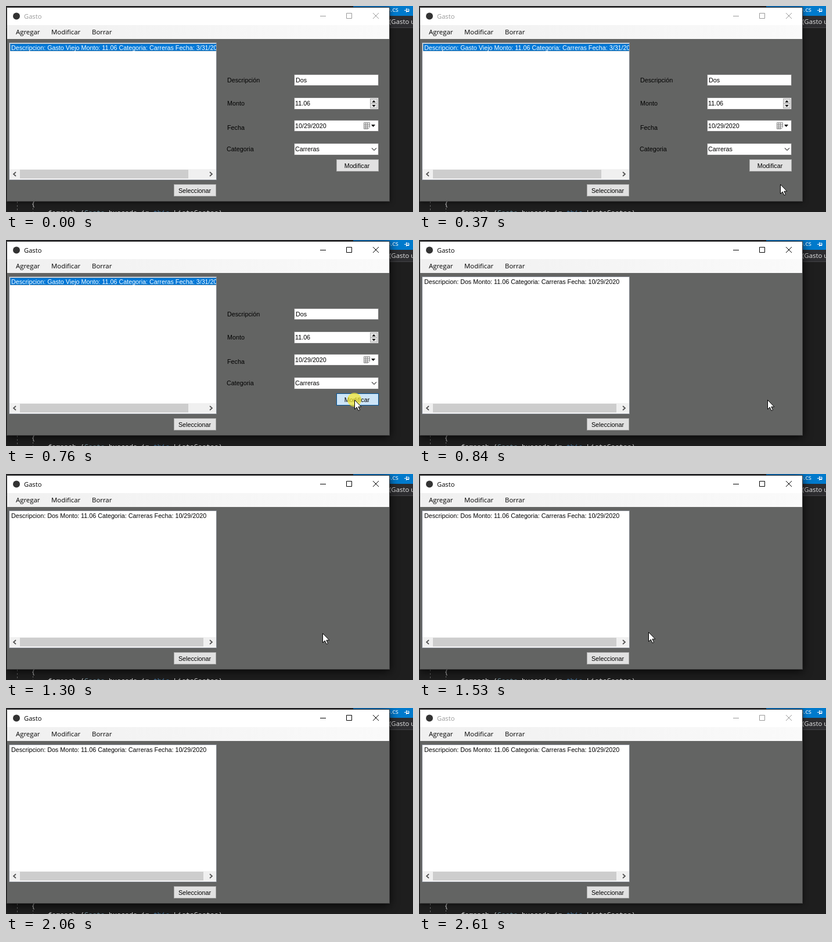
An HTML page that plays this animation: 701x356 px, repeating every 2.78 s.

```html
<!DOCTYPE html>
<html lang="es">
<meta charset="utf-8">
<title>Gasto</title>
<style>
  html, body { margin: 0; height: 100%; overflow: hidden; background: #1e1e1e; }
  svg { display: block; width: 701px; height: 356px; font: 10.75px "Liberation Sans", Arial, sans-serif; }
  text { white-space: pre; }
  rect { shape-rendering: crispEdges; }
  .ui { font: 11.4px "Open Sans", sans-serif; }
  .code { font: 11.66px "Noto Sans Mono", monospace; fill: #d4d4d4; }
  .field { fill: #fff; stroke: #7a7a7a; }
  .button { fill: #e1e1e1; stroke: #adadad; }
  .hover { fill: #e5f1fb; stroke: #0078d7; }
  .pressed { fill: #cce4f7; stroke: #005499; }
  .line { fill: none; stroke: #505050; }
  #shadow { filter: drop-shadow(0 1px 4px rgba(0, 0, 0, .6)); }
  .active #shadow { filter: drop-shadow(0 3px 8px rgba(0, 0, 0, .8)); }
  #caption { fill: #999; stroke: #999; }
  .active #caption { fill: #000; stroke: #000; }
  #caption text { stroke: none; }
</style>
<svg id="stage" viewBox="0 0 701 356">
  <defs>
    <linearGradient id="strip"><stop stop-color="#f0f0f0"/><stop offset="1" stop-color="#fafafa"/></linearGradient>
    <clipPath id="row"><rect x="6" y="64" width="356" height="16"/></clipPath>
  </defs>

  <!-- Code editor behind the window -->
  <rect width="701" height="356" fill="#1e1e1e"/>
  <rect width="701" height="37" fill="#2d2d30"/>
  <rect y="37" width="701" height="1" fill="#434346"/>
  <rect x="598" width="103" height="17" fill="#007acc"/>
  <g class="ui" fill="#e8e8e8">
    <text x="42" y="10">RegistroDeGastoUI.cs</text>
    <text x="208" y="10">ModificacionGastoUI.cs</text>
    <text x="382" y="10">ModificacionGastoUI.cs [Design]</text>
    <text x="676" y="10" text-anchor="end" fill="#fff">Repositorio.cs</text>
    <text x="660" y="31">(Gasto usuario)</text>
  </g>
  <path d="M686 7.5h3M689.5 4v7M690 5.5h4v4h-4M690 8.5h4" fill="none" stroke="#fff"/>
  <path d="M19.500 338v18M46.500 349v7" stroke="#666" stroke-dasharray="3 3"/>
  <g class="code">
    <text x="43.500" y="346">{</text>
    <text x="72" y="361">foreach (<tspan fill="#6f8f9c">Gasto</tspan> buscado in <tspan fill="#4c7ca5">this</tspan>.ListaGastos)</text>
  </g>

  <!-- Window frame -->
  <rect id="shadow" x="1" y="2" width="660" height="336" fill="#444"/>
  <rect x="2" y="3" width="658" height="30" fill="#fff"/>
  <rect x="2" y="33" width="658" height="24" fill="url(#strip)"/>
  <rect x="2" y="57" width="658" height="280" fill="#636463"/>
  <circle cx="18" cy="17.500" r="6" fill="#333"/>
  <g id="caption">
    <text class="ui" x="31" y="22" style="font-size:11.200px">Gasto</text>
    <path d="M541 17.500h10M586.500 12.500h9v9h-9zM632 12l10 10M642 12l-10 10" fill="none"/>
  </g>
  <g class="ui">
    <text x="17" y="49">Agregar</text>
    <text x="78" y="49">Modificar</text>
    <text x="148" y="49">Borrar</text>
  </g>

  <!-- Expense list -->
  <rect x="5.500" y="63.500" width="357" height="237" fill="#fff" stroke="#828790"/>
  <g id="selected" clip-path="url(#row)">
    <rect x="7" y="65" width="355" height="13" fill="#0078d7"/>
    <rect x="7.500" y="65.500" width="360" height="12" fill="none" stroke="#ff8728" stroke-dasharray="1" opacity=".5"/>
    <text x="9" y="76" fill="#fff">Descripcion: Gasto Viejo Monto: 11.06 Categoria: Carreras Fecha: 3/31/2020</text>
  </g>
  <text id="updated" x="9" y="76">Descripcion: Dos Monto: 11.06 Categoria: Carreras Fecha: 10/29/2020</text>
  <rect x="6" y="282" width="356" height="17" fill="#f0f0f0"/>
  <rect id="thumb" x="24" y="283" height="15" fill="#cdcdcd"/>
  <path class="line" d="M17 287l-4 3.500 4 3.500M351 287l4 3.500-4 3.500" stroke-width="1.700"/>
  <rect class="button" x="289.500" y="308.500" width="72" height="20"/>
  <text x="325" y="323" text-anchor="middle">Seleccionar</text>

  <!-- Edit form -->
  <g id="form">
    <text x="381" y="132">Descripción</text>
    <text x="381" y="172">Monto</text>
    <text x="381" y="214">Fecha</text>
    <text x="380" y="251">Categoria</text>
    <rect class="field" x="496.500" y="118.500" width="145" height="19"/>
    <rect class="field" x="496.500" y="158.500" width="145" height="20"/>
    <rect class="field" x="496.500" y="197.500" width="145" height="19"/>
    <rect class="field" x="496.500" y="237.500" width="145" height="20"/>
    <text x="499" y="132">Dos</text>
    <text x="498" y="172">11.06</text>
    <text x="498" y="211">10/29/2020</text>
    <text x="498" y="251">Carreras</text>
    <rect class="button" x="627.500" y="160.500" width="12" height="8"/>
    <rect class="button" x="627.500" y="168.500" width="12" height="8"/>
    <path d="M630.500 166.500h6l-3-3.500zM630.500 171h6l-3 3.500zM629 205h7l-3.500 4z"/>
    <path d="M616.500 201.500h10v8l-3 3h-7zM616 204.500h11M616 207.500h11M616 210.500h8M619.500 202v10M622.500 202v10" fill="#eee" stroke="#777" stroke-width=".8"/>
    <path class="line" d="M630 245.500l4 4 4-4" stroke-width="1.200"/>
    <rect id="modify" x="569.500" y="265.500" width="72" height="20"/>
    <text x="604.500" y="280" text-anchor="middle">Modificar</text>
  </g>

  <circle id="click" cx="600" cy="276" r="12" fill="#f5e62d" opacity=".72"/>
  <path id="cursor" d="M.5.500v16l3.700-3.500 2.800 6 2.500-1.200-2.700-5.600h5z" fill="#fff" stroke="#000"/>
</svg>
<script>
  const LOOP = 2780, CLICK = 760, DONE = 840, BLUR = 2610;
  const stops = [
    [0], [220, 647, 332], [300, 635, 320], [370, 622, 308], [450, 611, 293],
    [530, 603, 281], [600, 600, 277], [680, 600, 276],
    [1220, 590, 277], [1300, 545, 275], [1370, 485, 273], [1450, 430, 272],
    [1530, 395, 273], [1600, 382, 276], [1680, 377, 278],
    [1830, 397, 289], [1910, 465, 312], [1980, 567, 343], [2060]
  ];
  const $ = id => document.getElementById(id);
  const show = (id, on) => $(id).setAttribute("visibility", on ? "visible" : "hidden");

  function draw(now) {
    const t = now % LOOP;
    const [, x, y] = stops.findLast(stop => stop[0] <= t);
    const done = t >= DONE, clicking = t >= CLICK && !done;
    const inside = x >= 569 && x < 642 && y >= 265 && y < 286;

    $("stage").classList.toggle("active", t >= CLICK && t < BLUR);
    show("selected", !done);
    show("form", !done);
    show("updated", done);
    show("click", clicking);
    show("cursor", x !== undefined);
    if (x !== undefined) $("cursor").setAttribute("transform", `translate(${x} ${y})`);
    $("thumb").setAttribute("width", done ? 316 : 290);
    $("modify").setAttribute("class", clicking ? "pressed" : inside ? "hover" : "button");
  }

  const start = performance.now();
  (function tick() {
    draw(performance.now() - start);
    requestAnimationFrame(tick);
  })();
</script>
</html>
```
